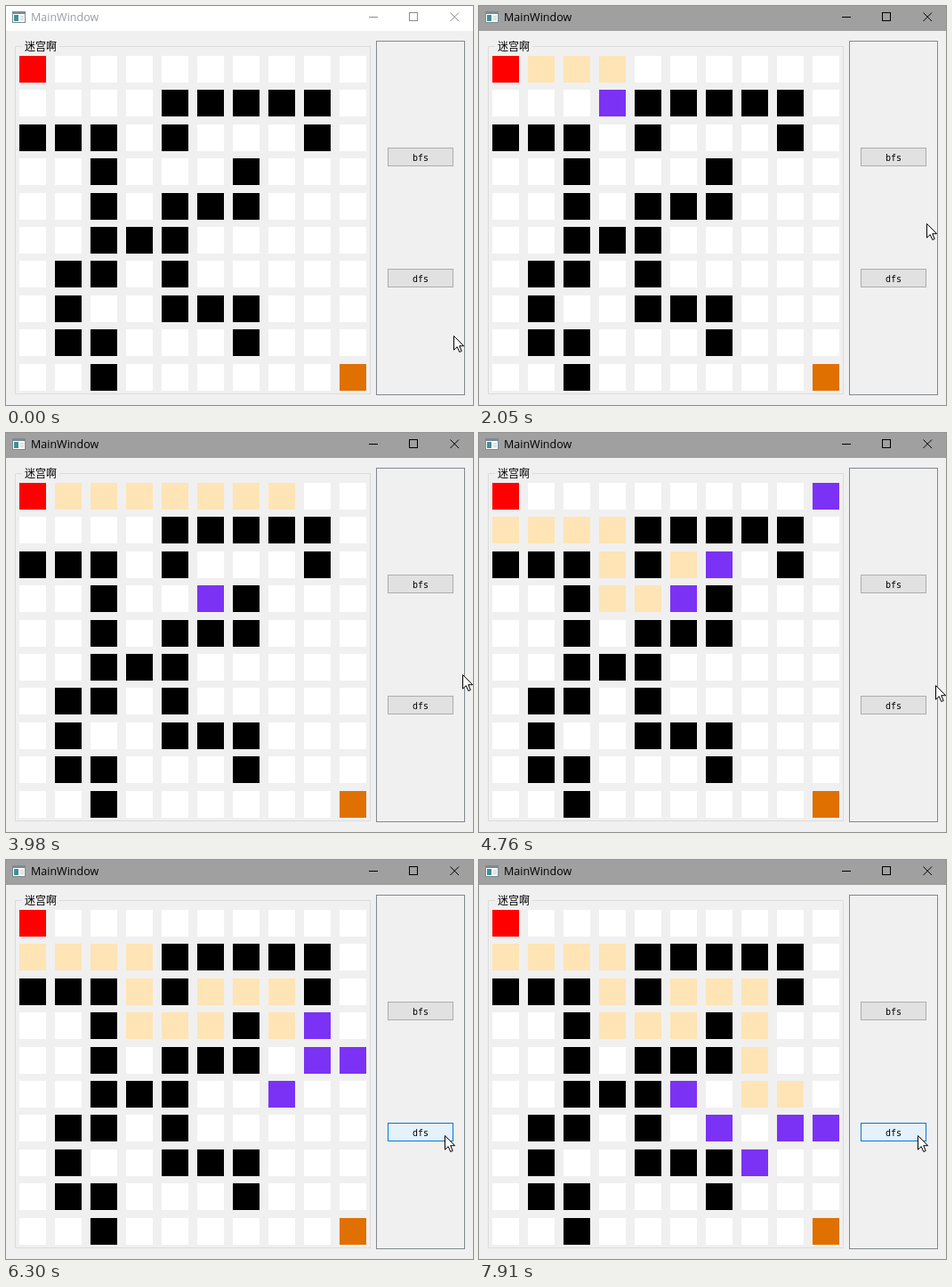
Animation, 525 px wide and 448 px high, one loop 7990 ms. Source, as an HTML page:

```html
<!DOCTYPE html>
<html lang="zh">
<head>
<meta charset="utf-8">
<title>Maze search</title>
<style>
html, body { margin: 0; width: 100%; height: 100%; overflow: hidden; background: #f0f0f0; }
svg { display: block; }
.title { font: 12.5px "Open Sans", "Noto Sans", sans-serif; }
.legend { font: 12px "Noto Sans CJK SC", "Noto Sans CJK", sans-serif; }
.label { font: 10px "DejaVu Sans Mono", monospace; text-anchor: middle; }
</style>
</head>
<body>
<svg id="stage" width="525" height="448" viewBox="0 0 525 448">
  <rect width="525" height="448" fill="#f0f0f0"/>
  <rect id="bar" width="525" height="28"/>
  <g shape-rendering="crispEdges">
    <rect x="7" y="6" width="15" height="13" fill="#7d8a92"/>
    <rect x="8" y="9" width="13" height="9" fill="#fff"/>
    <rect x="9" y="10" width="5" height="7" fill="#3f8f94"/>
    <path d="M16 11.5h4M16 13.5h4M16 15.5h4" stroke="#c4ccd0"/>
  </g>
  <text id="title" class="title" x="28" y="17">MainWindow</text>
  <g id="controls" fill="none">
    <path d="M408 12.5h10M453.5 7.5h9v9h-9z" shape-rendering="crispEdges"/>
    <path d="M499.5 7.5l9.5 9.5M509 7.5l-9.5 9.5"/>
  </g>
  <path d="M18 45.5H10.5V435.5H409.5V45.5H60" fill="none" stroke="#dcdcdc"/>
  <text class="legend" x="21" y="50">迷宫啊</text>
  <rect x="416.5" y="39.5" width="99" height="397" fill="none" stroke="#828790"/>
  <g id="cells" shape-rendering="crispEdges"></g>
  <g id="buttons"></g>
  <path id="pointer" d="M.5 .5V16.2L4.2 12.7L6.8 18.5L9.2 17.5L6.7 11.7H11.6Z" fill="#fff" stroke="#000"/>
</svg>
<script>
const LOOP = 7990, PRESS = 740, RELEASE = 860;
const SIZE = 10, GOAL = 99;
const WHITE = '#fff', PEACH = '#ffe4b5', PURPLE = '#7b32f5';
const maze = [
  '..........',
  '....#####.',
  '###.#...#.',
  '..#...#...',
  '..#.###...',
  '..###.....',
  '.##.#.....',
  '.#..###...',
  '.##...#...',
  '..#.......'
].join('');

// [time, x, y] of the pointer tip
const pointerTrack = [
  [70, 503, 370], [510, 488, 167], [1100, 488, 167], [2050, 503, 244],
  [2360, 513, 259], [2830, 513, 260], [3750, 513, 267], [4210, 513, 274],
  [4760, 513, 283], [4990, 513, 283], [5610, 508, 302], [5760, 493, 309]
];
// [time, index of the visited node]
const searchTrack = [
  [860, 0], [2010, 6], [2410, 7], [3040, 10], [3742, 14], [4585, 18],
  [5440, 22], [6930, 30], [7330, 31], [7880, 34], [8075, 35]
];

const $ = id => document.getElementById(id);

function add(parent, tag, attrs) {
  const node = document.createElementNS('http://www.w3.org/2000/svg', tag);
  for (const key in attrs) node.setAttribute(key, attrs[key]);
  return parent.appendChild(node);
}

function track(points, t) {
  if (t <= points[0][0]) return points[0].slice(1);
  const i = points.findIndex(p => p[0] > t);
  if (i < 0) return points[points.length - 1].slice(1);
  const a = points[i - 1], b = points[i];
  const u = (t - a[0]) / (b[0] - a[0]);
  return a.slice(1).map((v, k) => v + (b[k + 1] - v) * u);
}

function neighbours(cell) {
  const row = Math.floor(cell / SIZE), col = cell % SIZE;
  return [[-1, 0], [1, 0], [0, -1], [0, 1]]
    .map(([dr, dc]) => [row + dr, col + dc])
    .filter(([r, c]) => r >= 0 && c >= 0 && r < SIZE && c < SIZE)
    .map(([r, c]) => r * SIZE + c)
    .filter(n => maze[n] === '.');
}

function search() {
  const parent = { 0: -1 }, queue = [0], steps = [];
  while (queue.length) {
    const current = queue.shift(), path = [], near = neighbours(current);
    for (let c = current; c >= 0; c = parent[c]) path.push(c);
    steps.push({ current, path, near, from: parent[current], waiting: [...queue] });
    for (const n of near) {
      if (n in parent) continue;
      parent[n] = current;
      queue.push(n);
    }
  }
  return steps;
}

function cellColours(t) {
  const colours = [...maze].map(c => c === '#' ? '#000' : WHITE);
  const paint = (list, colour) => list.forEach(c => { colours[c] = colour; });
  if (t >= searchTrack[0][0]) {
    const [position] = track(searchTrack, t);
    const step = steps[Math.floor(position)], phase = position % 1;
    paint(step.path, PEACH);
    paint(step.waiting, PURPLE);
    if (phase >= .78) {
      paint(step.near, PURPLE);
    } else if (phase >= .33) {
      paint(step.near.filter(n => n !== step.from), PURPLE);
      paint([step.current], WHITE);
    }
  }
  colours[0] = '#f00';
  colours[GOAL] = '#e07000';
  return colours;
}

const steps = search();
const cells = Array.from({ length: SIZE * SIZE }, (_, i) => add($('cells'), 'rect', {
  x: 15 + 40 * (i % SIZE),
  y: Math.round(56 + 38.4 * Math.floor(i / SIZE)),
  width: 30, height: 30
}));

function button(name, y) {
  const box = add($('buttons'), 'rect', { x: 429.5, y: y + .5, width: 73, height: 20 });
  add($('buttons'), 'text', { class: 'label', x: 466, y: y + 15 }).textContent = name;
  return box;
}
const bfs = button('bfs', 159), dfs = button('dfs', 295);

const looks = {
  idle: ['#e1e1e1', '#adadad'],
  hover: ['#e5f1fb', '#0078d7'],
  down: ['#cce4f7', '#005499']
};
function setLook(box, look) {
  box.setAttribute('fill', looks[look][0]);
  box.setAttribute('stroke', looks[look][1]);
}

function render(t) {
  const active = t >= PRESS;
  $('bar').setAttribute('fill', active ? '#a0a0a0' : '#fff');
  $('title').setAttribute('fill', active ? '#000' : '#999da3');
  $('controls').setAttribute('stroke', active ? '#000' : '#8c8c8c');

  cellColours(t).forEach((colour, i) => cells[i].setAttribute('fill', colour));

  const [x, y] = track(pointerTrack, t).map(Math.round);
  $('pointer').setAttribute('transform', `translate(${x} ${y})`);
  const overBfs = x < 503 && y >= 159 && y < 180;
  setLook(bfs, overBfs ? (active && t < RELEASE ? 'down' : 'hover') : 'idle');
  setLook(dfs, t >= 5840 ? 'hover' : 'idle');
}

const start = performance.now();
function tick() {
  render((performance.now() - start) % LOOP);
  requestAnimationFrame(tick);
}
tick();
</script>
</body>
</html>
```
